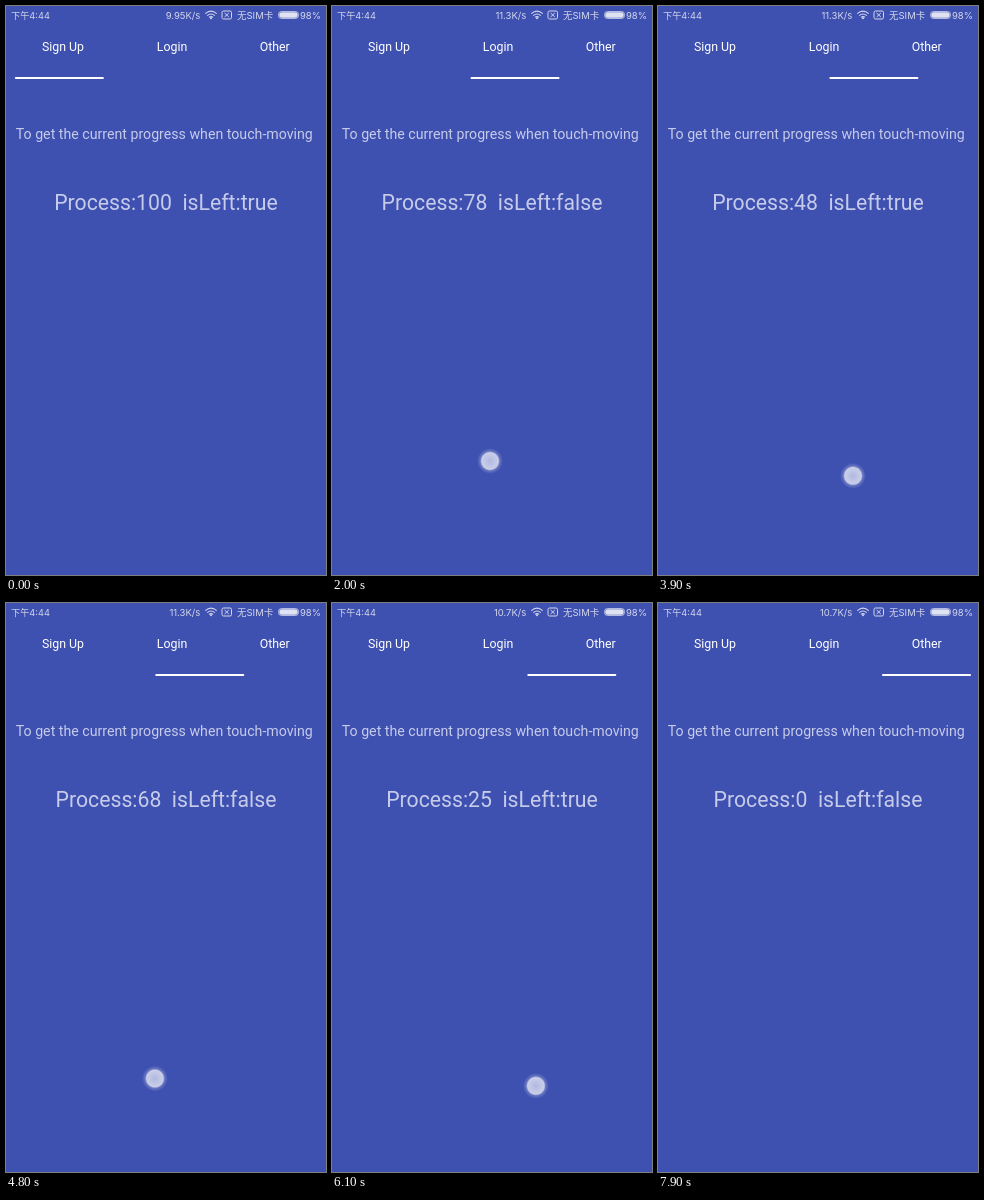
An HTML page that plays this animation: 320x569 px, repeating every 8000 ms.

```html
<!DOCTYPE html>
<html lang="en">
<head>
<meta charset="utf-8">
<title>Tab progress</title>
<style>
html, body { margin: 0; width: 100%; height: 100%; overflow: hidden; background: #3e50b0; }
svg { display: block; width: 100vw; height: 100vh; }
text { font-family: Roboto, sans-serif; }
.status text { font: 9.5px Inter, "Noto Sans CJK SC", "Noto Sans CJK", sans-serif; fill: #d3d7ed; }
.tab { font-size: 12.35px; fill: #fff; text-anchor: middle; }
.body { fill: #c6cbea; text-anchor: middle; }
</style>
</head>
<body>
<svg viewBox="0 0 320 569">
  <defs>
    <radialGradient id="glow">
      <stop offset="0" stop-color="#fff" stop-opacity=".6"/>
      <stop offset=".64" stop-color="#fff" stop-opacity=".72"/>
      <stop offset=".75" stop-color="#fff" stop-opacity=".22"/>
      <stop offset="1" stop-color="#fff" stop-opacity="0"/>
    </radialGradient>
  </defs>
  <g class="status">
    <text x="5" y="12.8" style="font-size:9.2px">下午4:44</text>
    <text id="speed" x="194.3" y="12.8" text-anchor="end"></text>
    <text x="231" y="12.8">无SIM卡</text>
    <text x="315" y="12.8" text-anchor="end">98%</text>
  </g>
  <g fill="none" stroke="#d3d7ed">
    <path d="M199.3 7.6Q205 2.8 210.7 7.6M201.2 9.6Q205 6.4 208.8 9.6M203 11.4Q205 9.8 207 11.4" stroke-width="1.2"/>
    <rect x="216" y="5" width="9.5" height="8" rx="1.5"/>
    <path d="M218.6 7l4.2 4M222.8 7l-4.2 4"/>
    <rect x="272.5" y="5.5" width="20" height="7" rx="3" stroke-width=".8"/>
  </g>
  <circle cx="205" cy="12.2" r="1" fill="#d3d7ed"/>
  <rect x="273.3" y="6.3" width="18.4" height="5.4" rx="2.3" fill="#dfe2f3"/>
  <g class="tab">
    <text x="57" y="45">Sign Up</text>
    <text x="166" y="45">Login</text>
    <text x="268.7" y="45">Other</text>
  </g>
  <rect id="bar" y="71.1" width="89" height="1.8" rx=".9" fill="#fff"/>
  <text class="body" x="158.3" y="132.7" font-size="14.18">To get the current progress when touch-moving</text>
  <text class="body" id="info" x="160" y="204.2" font-size="21.22"></text>
  <circle id="touch" r="13" fill="url(#glow)"/>
</svg>
<script>
const LOOP = 8000, STEP = 100, LAST = 2;
const $ = id => document.getElementById(id);

// start, end, from page, to page
const swipes = [
  [-500, 0, 1, 0],
  [700, 1400, 0, 1],
  [1700, 2700, 1, 2],
  [3600, 4220, 2, 1],
  [4500, 5300, 1, 2],
  [5800, 6715, 2, 1],
  [7200, 7600, 1, 2]
];

// finger down, finger up, first x, px per ms
const presses = [
  [600, 1000, 236, -.3],
  [1600, 2200, 234, -.19],
  [2800, 3400, 300, -.173],
  [3500, 4000, 99, .24],
  [4500, 5000, 256, -.357],
  [5800, 6300, 116, .293],
  [7200, 7500, 245, -.45]
];

const clamp = v => Math.max(0, Math.min(1, v));
const smooth = u => u * u * (3 - 2 * u);

// Spring past the last page and back
const bounce = ms => .06 * Math.sin(Math.PI * clamp(ms / 330));

function draw(t) {
  const [start, end, from, to] = swipes.findLast(s => t > s[0]);
  let page = from + (to - from) * smooth(clamp((t - start) / (end - start)));
  if (to === LAST) page += bounce(t - end);
  $("bar").setAttribute("x", 8.85 + page * 320 / 3);

  const progress = Math.round(100 * clamp(1 + Math.min(from, to) - page));
  $("info").textContent = `Process:${progress}\u00a0\u00a0isLeft:${to < from}`;
  $("speed").textContent = t < 1200 ? "9.95K/s" : t < 5200 ? "11.3K/s" : "10.7K/s";

  const press = presses.find(([down, up]) => t >= down && t <= up);
  $("touch").setAttribute("visibility", press ? "visible" : "hidden");
  if (press) {
    const [down, , x, speed] = press;
    $("touch").setAttribute("cx", x + speed * (t - down));
    $("touch").setAttribute("cy", 432 + 23 * ((t - 600) / 1400) ** .58);
  }
}

const begin = performance.now();
function tick() {
  const t = (performance.now() - begin) % LOOP;
  draw(Math.floor(t / STEP) * STEP);
  requestAnimationFrame(tick);
}
tick();
</script>
</body>
</html>
```
